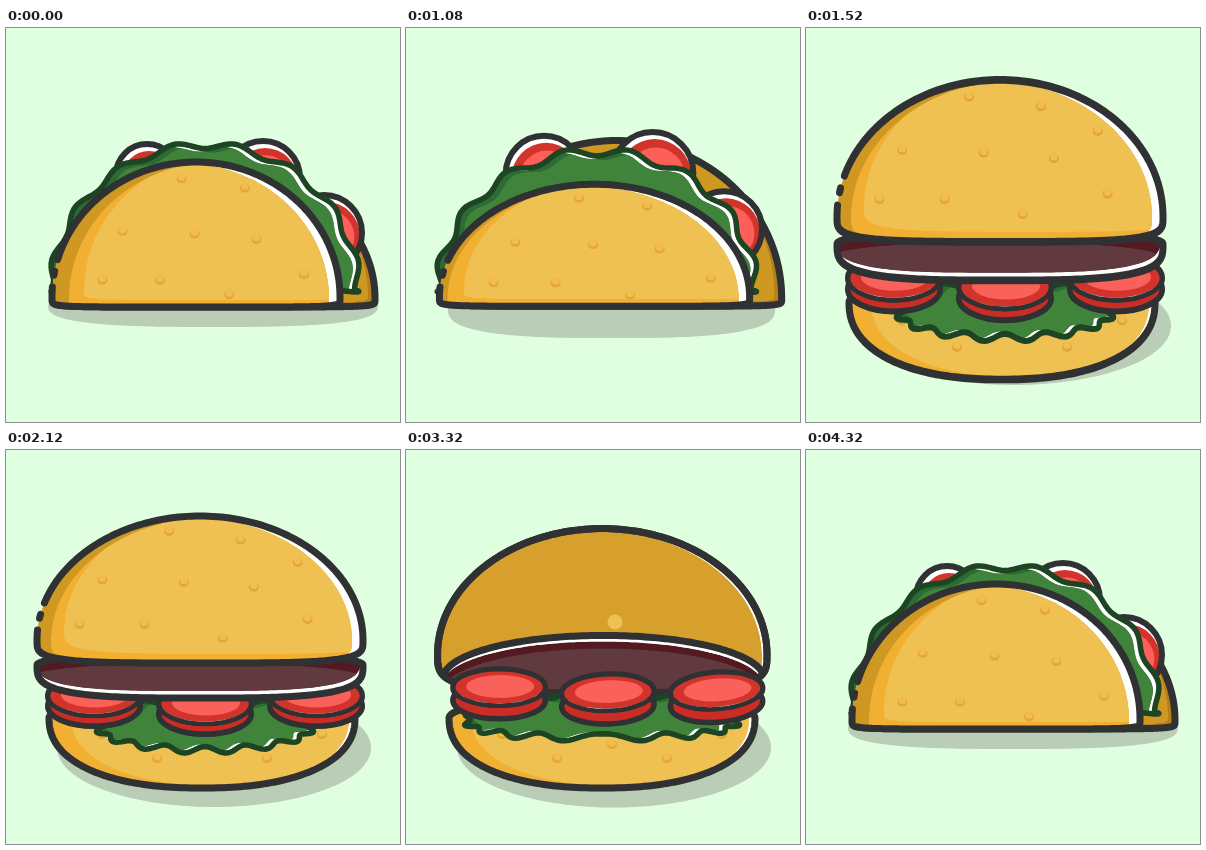
Write an HTML page with a canvas that moves like this. It is 394 px wide and 394 px high and loops after 4.64 s.

```html
<!DOCTYPE html>
<html lang="en">
<head>
<meta charset="utf-8">
<title>Taco and burger</title>
<style>
html, body { margin: 0; width: 100%; height: 100%; overflow: hidden; background: #e0ffe0; }
canvas { display: block; width: 394px; height: 394px; }
</style>
</head>
<body>
<canvas id="stage"></canvas>
<script>
const SIZE = 394, LOOP = 4640, STEP = 40, WAVES = 16;
const INK = '#2f3133', GOLD = '#cf9823', ORANGE = '#f2b033', DOUGH = '#efc153';
const LEFT_GAPS = [10, 12, 4, 12, 3000];
const canvas = document.getElementById('stage');
const ratio = window.devicePixelRatio || 1;
canvas.width = canvas.height = SIZE * ratio;
const g = canvas.getContext('2d');

// Poses: closed taco, open taco, open burger, closed burger.
// Each is: centre x, y, half width, height above, depth below, corner power of the lower half, ripple
const BACK = [
  [208, 270, 161, 133, 9, .3, 0], [211, 270, 167, 166, 8, .3, 0],
  [198, 215, 166, 127, 50, .6, 0], [194, 190, 163, 124, 23, .5, 0]
];
const BUN = [196, 268, 153, 22, 70, .88, 0];
const FRONT = [[190, 269, 144, 135, 10, .3, 0], [188, 269, 159, 105, 9, .3, 0], BUN, BUN];
const LEAF = [
  [199, 262, 153, 145, 6, 1, 3.5], [188, 262, 160, 136, 6, 1, 4.5],
  [194, 264, 157, 26, 14, .6, 4], [199, 277, 107, 28, 23, 1, 3.5]
];
const OPEN_PATTY = [200, 238, 158, 65, 30, .6, 0];
const PATTY = [OPEN_PATTY, OPEN_PATTY, OPEN_PATTY, [194, 215, 163, 13, 33, .6, 0]];
const SHADOW = [
  [207, 277, 165, 5, 22, .7, 0], [205, 282, 163, 5, 32, .72, 0],
  [208, 297, 157, 60, 61, 1, 0], [208, 298, 157, 60, 59, 1, 0]
];
// x, y and radius in the closed and the open taco
const SLICES = [
  [[141, 147, 31], [137, 146, 41]],
  [[257, 150, 37], [243, 143, 42]],
  [[318, 205, 38], [318, 200, 38]]
];
// Places on a dome, as parts of its half width and height
const SEEDS = [
  [-.19, .88], [.25, .81], [-.6, .49], [-.1, .47], [.33, .43],
  [-.74, .13], [-.34, .13], [.14, .02], [.66, .17], [.6, .63]
];

const lerp = (a, b, f) => a + (b - a) * f;
const ramp = (t, a, b) => Math.min(1, Math.max(0, (t - a) / (b - a)));
const bump = (t, a, b) => Math.sin(Math.PI * ramp(t, a, b));
const bend = (v, power) => Math.sign(v) * Math.abs(v) ** power;

function mix(poses, s) {
  const i = Math.min(2, Math.floor(s));
  return poses[i].map((v, j) => lerp(v, poses[i + 1][j], s - i));
}

function poseAt(t) {
  const open = 1.2 * ramp(t, 640, 1200) ** 2 + 1.8 * ramp(t, 1200, 1470);
  const close = 2 * ramp(t, 3240, 3520) + 1 - (1 - ramp(t, 3520, 4040)) ** 2;
  return Math.max(0, open - close);
}

function stretchAt(t) {
  return 1 + .13 * bump(t, 1440, 1720) - .015 * bump(t, 1800, 2120) + .05 * bump(t, 3040, 3280);
}

// Dome over a rounded base, drawn clockwise from its left end
function blob([x, y, rx, up, down, power, ripple]) {
  const path = new Path2D(), n = 240;
  for (let i = 0; i < n; i++) {
    const a = Math.PI * (1 - 2 * i / n), c = Math.cos(a), s = Math.sin(a);
    const p = s < 0 ? power : 1;
    const wave = -ripple * Math.cos(WAVES * (a - Math.PI / 2));
    path.lineTo(
      x + rx * bend(c, p) + wave * c,
      y - (s < 0 ? down : up) * bend(s, p) - wave * s);
  }
  path.closePath();
  return path;
}

function oval(x, y, rx, ry = rx, tilt = 0) {
  const path = new Path2D();
  path.ellipse(x, y, rx, ry, tilt, 0, 7);
  return path;
}

function fill(path, color) {
  g.fillStyle = color;
  g.fill(path);
}

function outline(path, width = 7, color = INK, dash = []) {
  g.lineWidth = width;
  g.strokeStyle = color;
  g.setLineDash(dash);
  g.stroke(path);
  g.setLineDash([]);
}

// Nested layers, each the shape shifted within the one before
function shade(path, base, ...layers) {
  g.save();
  g.clip(path);
  fill(path, base);
  for (const [dx, dy, color] of layers) {
    const moved = new Path2D();
    moved.addPath(path, new DOMMatrix([1, 0, 0, 1, dx, dy]));
    g.clip(moved);
    fill(moved, color);
  }
  g.restore();
}

function seed(x, y) {
  fill(oval(x, y + .5, 5, 4.5), '#e3a632');
  fill(oval(x, y - .8, 3.8, 3.2), '#f1bd4c');
}

function domeSeeds([x, y, rx, up], places, shift = 0) {
  for (const [u, v] of places) seed(x + rx * (u + shift), y - up * v);
}

function drawBack(s) {
  const path = blob(mix(BACK, s));
  if (s < 1.5) shade(path, '#b5801a', [-7, -4, GOLD]);
  else shade(path, '#fff', [-5, 2, '#d79f2c']);
  outline(path);
  return path;
}

function drawTopBun(s) {
  const shape = mix(BACK, s), path = blob(shape);
  shade(path, '#fff', [-11, 1, GOLD], [14, 1, ORANGE], [27, -9, DOUGH]);
  domeSeeds(shape, SEEDS);
  outline(path, 7, INK, LEFT_GAPS);
}

function drawShell(s) {
  const shape = mix(FRONT, s), path = blob(shape), o = Math.min(1, s);
  shade(path, '#fff', [-11, 2, GOLD], [lerp(17, 5, o), 1, ORANGE], [lerp(32, 22, o), -7, DOUGH]);
  domeSeeds(shape, SEEDS.slice(0, 9), .09);
  outline(path, 7, INK, LEFT_GAPS);
}

function drawBottomBun() {
  const path = blob(BUN);
  shade(path, '#fff', [-6, 0, ORANGE], [22, -2, DOUGH]);
  for (let i = 0; i < 5; i++) seed(96 + 55 * i, 284 + 24 * (i % 2) + 10 * (i === 2));
  outline(path);
}

function drawLeaf(s) {
  const path = blob(mix(LEAF, s));
  shade(path, '#fff', [-6, s < 1.5 ? 3 : -2, '#2c6b31'], [7, 4, '#40843b']);
  outline(path, 5.5, '#1d4524');
}

function drawSlices() {
  for (const poses of arguments[0]) {
    const [x, y, r] = poses;
    const face = oval(x, y, r);
    fill(face, '#fff');
    fill(oval(x + 2, y + 3, r - 4), '#d2342c');
    fill(oval(x + 3, y + 4, r * .72), '#ff5f59');
    outline(face, 6);
  }
}

function drawDiscs(s) {
  const f = s - 2;
  for (let i = 0; i < 3; i++) {
    const x = lerp(97 + 107 * i, 88 + 111 * i, f);
    const y = lerp(231 + 3 * i, 246 + 8 * (i % 2), f);
    const rx = 46, ry = lerp(17, 20, f), thick = lerp(15, 10, f);
    const tilt = -.06 * i * (1 - f);
    const side = oval(x, y + thick, rx, ry, tilt), face = oval(x, y, rx, ry, tilt);
    outline(side, 6);
    outline(face, 6);
    fill(side, '#c92d25');
    outline(face, 4);
    fill(face, '#fff');
    fill(oval(x, y - 1.5, rx - 1, ry - 1, tilt), '#d2342c');
    fill(oval(x + 1, y - 1, rx * .74, ry * .62, tilt), '#fb615b');
    outline(side, 5, INK);
    g.save();
    g.clip(face);
    fill(oval(x, y - 1.5, rx - 1, ry - 1, tilt), '#d2342c');
    fill(oval(x + 1, y - 1, rx * .74, ry * .62, tilt), '#fb615b');
    g.restore();
    outline(face, 4.5);
  }
}

function drawPatty(s) {
  const path = blob(mix(PATTY, s));
  if (s < 2.5) shade(path, '#fff', [-1, 6, '#541a22'], [0, 13, '#603a3e']);
  else shade(path, '#fff', [-2, -7, '#541a22'], [-4, 11, '#603a3e']);
  outline(path);
}

function drawTaco(s) {
  drawBack(s);
  drawSlices(SLICES.map(([shut, open]) => shut.map((v, j) => lerp(v, open[j], s))));
  drawLeaf(s);
  drawShell(s);
}

function drawOpenBurger(s) {
  const dome = drawBack(s);
  g.save();
  g.clip(dome);
  drawPatty(s);
  g.restore();
  outline(dome);
  fill(oval(209, 172, 7.5), DOUGH);
  drawBottomBun();
  drawLeaf(s);
  drawDiscs(s);
}

function drawBurger(s) {
  drawBottomBun();
  drawLeaf(s);
  drawDiscs(s);
  drawPatty(s);
  drawTopBun(s);
}

function draw(t) {
  const s = poseAt(t);
  g.setTransform(ratio, 0, 0, ratio, 0, 0);
  g.lineCap = g.lineJoin = 'round';
  g.fillStyle = '#e0ffe0';
  g.fillRect(0, 0, SIZE, SIZE);
  fill(blob(mix(SHADOW, s)), '#b9cdb7');
  g.translate(0, 205);
  g.scale(1, stretchAt(t));
  g.translate(0, -205);
  if (s < 1.5) drawTaco(s);
  else if (s < 2.5) drawOpenBurger(s);
  else drawBurger(s);
}

function tick() {
  draw(Math.floor(performance.now() % LOOP / STEP) * STEP);
  requestAnimationFrame(tick);
}
tick();
</script>
</body>
</html>
```
